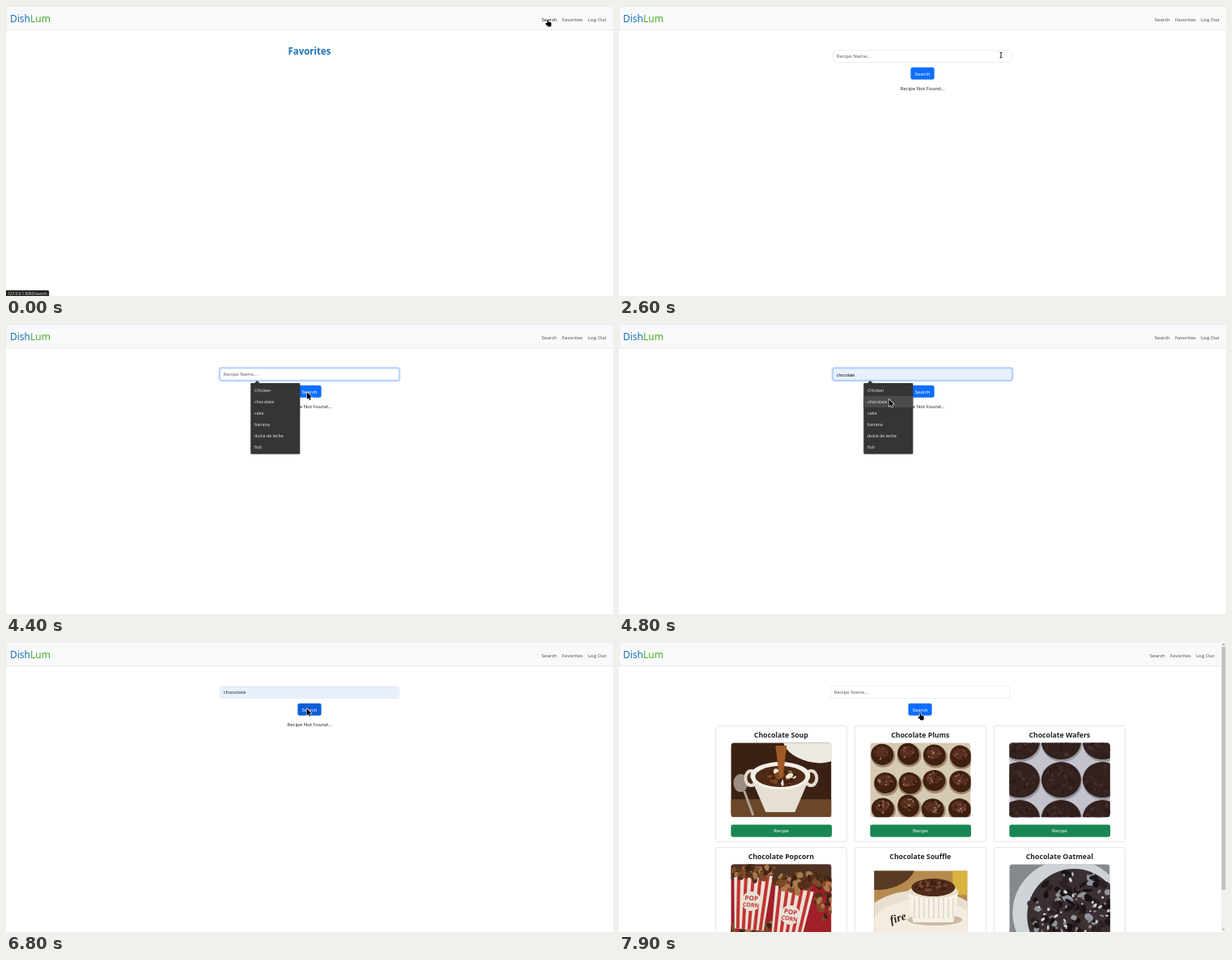
Write an HTML page with a canvas that moves like this. It is 750 px wide and 358 px high and loops after 8 s.

```html
<!DOCTYPE html>
<html lang="en">
<head>
<meta charset="utf-8">
<title>Recipe search</title>
<style>
html, body { margin: 0; width: 100%; height: 100%; overflow: hidden; background: #fff; }
canvas { display: block; width: 750px; height: 358px; }
</style>
</head>
<body>
<canvas id="stage"></canvas>
<script>
const W = 750, H = 358, LOOP = 8000, STEP = 100, SMALL = 6.05;
const SANS = '"Noto Sans", "Open Sans", sans-serif';
const INK = '#212529', GREY = '#4d4f51', BLUE = '#1b72b8';
const canvas = document.getElementById('stage');
const ctx = canvas.getContext('2d');
const ratio = window.devicePixelRatio || 1;
canvas.width = W * ratio;
canvas.height = H * ratio;

const items = ['CHicken', 'chocolate', 'cake', 'banana', 'dulce de leche', 'fish'];
const dishes = [
  ['Soup', soup], ['Plums', plums], ['Wafers', wafers],
  ['Popcorn', popcorn], ['Souffle', souffle], ['Oatmeal', oatmeal]
];

// Pointer stops: each is reached at `end` with an ease-out of the given power.
const home = { x: 669.5, y: 17 };
const stops = [
  { start: 1400, end: 2600, x: 472, y: 61, power: 1.7 },
  { start: 3800, end: 4800, x: 333.5, y: 93, power: 1.4 },
  { start: 5900, end: 6500, x: 371.5, y: 82, power: 1.6 },
  { start: 7600, end: 7900, x: 372.5, y: 88, power: 1 }
];

function text(str, x, y, size, color, align = 'left', weight = 400, family = SANS) {
  ctx.font = `${weight} ${size}px ${family}`;
  ctx.textAlign = align;
  ctx.fillStyle = color;
  ctx.fillText(str, x, y);
}

function rect(x, y, w, h, color) {
  ctx.fillStyle = color;
  ctx.fillRect(x, y, w, h);
}

function box(x, y, w, h, r, fill, stroke, line = 0.8) {
  ctx.beginPath();
  ctx.roundRect(x, y, w, h, r);
  if (fill) { ctx.fillStyle = fill; ctx.fill(); }
  if (stroke) { ctx.strokeStyle = stroke; ctx.lineWidth = line; ctx.stroke(); }
}

function oval(x, y, rx, ry, color, turn = 0) {
  ctx.fillStyle = color;
  ctx.beginPath();
  ctx.ellipse(x, y, rx, ry, turn, 0, Math.PI * 2);
  ctx.fill();
}

// Upright trapezoid centred on x, with half widths a (top) and b (bottom).
function taper(x, y, a, b, h, color) {
  ctx.fillStyle = color;
  ctx.beginPath();
  ctx.moveTo(x - a, y);
  ctx.lineTo(x + a, y);
  ctx.lineTo(x + b, y + h);
  ctx.lineTo(x - b, y + h);
  ctx.fill();
}

function turned(x, y, angle, paint) {
  ctx.save();
  ctx.translate(x, y);
  ctx.rotate(angle);
  paint();
  ctx.restore();
}

function seeded(seed) {
  return () => (seed = (seed * 16807) % 2147483647) / 2147483647;
}

// Random specks inside an ellipse.
function specks(count, x, y, rx, ry, size, colors) {
  const rnd = seeded(count * 31);
  for (let i = 0; i < count; i++) {
    const a = rnd() * Math.PI * 2, d = Math.sqrt(rnd());
    oval(x + rx * d * Math.cos(a), y + ry * d * Math.sin(a),
      size * (0.5 + rnd()), size * (0.4 + rnd() / 2), colors[i % colors.length], a * 3);
  }
}

function header(dx, hover) {
  rect(0, 0, W, 29, '#f8f9fa');
  rect(0, 0, W, 0.6, '#e3e4e6');
  rect(0, 0, 0.6, 29, '#e3e4e6');
  rect(0, 29, W, 0.7, '#dedfe1');
  text('Dish', 5, 19.5, 12, BLUE);
  text('Lum', 5 + ctx.measureText('Dish').width, 19.5, 12, '#4cb02e');
  text('Search', 661.7 + dx, 18.7, SMALL, hover ? INK : GREY);
  text('Favorites', 686.9 + dx, 18.7, SMALL, GREY);
  text('Log Out', 718.9 + dx, 18.7, SMALL, GREY);
}

function form(dx, { focus, filled, preview, value, caret, hot }) {
  const x = 264.3 + dx, left = x + 4.5;
  if (focus) box(x - 0.8, 53.9, 223, 16.4, 3, null, `rgba(13,110,253,${0.25 * focus})`, 1.8);
  box(x, 54.8, 221.4, 14.6, 2.4, filled ? '#e8f0fe' : '#fff', focus ? '#86b7fe' : '#e4e7ea', 0.7);
  if (preview) text(preview, left, 64.6, 5.25, '#111', 'left', 400, '"Liberation Sans", sans-serif');
  else if (value) text(value, left, 64.3, 6.1, INK);
  else text('Recipe Name...', left, 64.3, SMALL, '#565c62');
  if (caret) rect(value ? 296.8 : 269, 58.5, 0.6, 7, '#222');
  box(360.4 + dx, 75.8, 29.2, 15, 2.4, hot ? '#0b5ed7' : '#0d6efd');
  text('Search', 375 + dx, 85.5, SMALL, '#fff', 'center');
}

function dropdown(row) {
  const x = 302.3, y = 73, gap = 14.05;
  ctx.save();
  ctx.shadowColor = 'rgba(0,0,0,.3)';
  ctx.shadowBlur = 2 * ratio;
  box(x, y, 60.9, 87.6, 1, '#353535');
  ctx.restore();
  taper(x + 8, y - 3.2, 0, 3.4, 3.4, '#353535');
  if (row >= 0) rect(x, y + 1.8 + row * gap, 60.9, gap, '#4b4b4b');
  items.forEach((name, i) => text(name, x + 4.7, y + 10.5 + i * gap, 5.33, '#e4e4e4'));
}

// The dishes are painted around the centre of a 124 by 92 photo.
function soup() {
  rect(-62, -46, 124, 92, '#3a2114');
  rect(-62, 24, 124, 22, '#6b4629');
  oval(-50, 4, 9, 11, '#9c8d7f');
  turned(-46, 14, -0.35, () => rect(-1, 0, 3, 32, '#b0a294'));
  for (const side of [-1, 1]) {
    oval(side * 37, -2, 9, 11, '#e2dbcf');
    oval(side * 37, -2, 5, 7, '#4a2c1a');
  }
  taper(-1, -4, 37, 18, 44, '#e6dfd3');
  oval(-1, -5, 37, 17, '#f4f0e8');
  oval(-1, -4, 31, 13, '#4f2b17');
  specks(24, 0, -4, 17, 8, 4, ['#eee4d2', '#7c4723', '#3f2012']);
  oval(38, -42, 36, 20, '#efeae1', 0.25);
  taper(0, -42, 7, 2, 40, '#a05a26');
}

function plums() {
  rect(-62, -46, 124, 92, '#d6cab4');
  const rnd = seeded(77);
  for (let i = 0; i < 12; i++) {
    const x = -47 + (i % 4) * 31 + rnd() * 4, y = -32 + Math.floor(i / 4) * 32 + rnd() * 6;
    oval(x + 1, y + 2, 15, 14, '#a08a6c');
    oval(x, y, 14, 13, '#40200f', rnd());
    oval(x - 1, y - 3, 9, 7, '#593020');
    specks(5 + i, x, y - 2, 9, 8, 1.5, ['#7d4e38', '#2e150b', '#a47c64']);
  }
}

function wafers() {
  rect(-62, -46, 124, 92, '#c2c3cc');
  for (let i = 0; i < 9; i++) {
    const x = (i % 3 - 1) * 51 + 2, y = (Math.floor(i / 3) - 1) * 47;
    oval(x + 1, y + 2, 25, 23, '#96969f');
    oval(x, y, 24.5, 22, '#32211d');
    specks(26 + i, x, y, 20, 18, 2.5, ['#2a1a17', '#42302a', '#3a2822']);
  }
}

function carton(x, y, angle) {
  turned(x, y, angle, () => {
    taper(0, -22, 24, 18, 68, '#e9e1d7');
    for (let i = -2; i <= 2; i++) {
      turned(i * 9, -22, i * 0.03, () => rect(-2, 0, 4, 68, '#c23431'));
    }
    oval(0, 11, 12, 12, '#e9e1d7');
    text('POP', 0, 10, 8, '#c23431', 'center', 700);
    text('CORN', 0, 18, 7, '#c23431', 'center', 700);
  });
}

function popcorn() {
  const tones = ['#3f2416', '#7d4a28', '#57311c', '#a87a4a'];
  rect(-62, -46, 124, 92, '#a01f29');
  rect(-62, -46, 124, 19, '#4b3326');
  specks(50, -30, 40, 50, 12, 5, tones);
  specks(30, 54, -8, 12, 34, 4, tones);
  carton(-36, -11, 0.08);
  carton(13, 6, 0.17);
  specks(60, -34, -36, 27, 10, 4.5, tones);
  specks(64, 20, -24, 29, 11, 4.5, tones);
}

function souffle() {
  rect(-62, -46, 124, 92, '#b68a4f');
  oval(-40, -34, 34, 18, '#593a24', -0.3);
  rect(40, -38, 22, 30, '#d9b23f');
  oval(2, 24, 72, 38, '#e8dfcf');
  oval(4, 27, 62, 30, '#f3ecdf');
  oval(18, 23, 34, 7, '#cabba4');
  taper(16, -13, 31, 25, 39, '#f7f2e8');
  for (let x = -8; x < 44; x += 6) rect(x, -4, 1.2, 25, '#d9cebc');
  oval(16, -12, 31, 8, '#e9decb');
  oval(16, -17, 27, 11, '#4e2b1b');
  specks(40, 16, -19, 22, 6, 2, ['#754831', '#3a1e12']);
  turned(-36, 28, -0.3, () => text('fire', 0, 0, 14, '#33211a', 'left', 'italic 700', '"Liberation Serif", serif'));
}

function oatmeal() {
  rect(-62, -46, 124, 92, '#85898e');
  oval(12, 14, 70, 66, '#cdd3d7');
  oval(18, 18, 58, 58, '#3a3032');
  specks(150, 18, 16, 54, 54, 5, ['#1d1618', '#3f3032', '#2b2022', '#8f979d', '#171113']);
  specks(60, 18, 14, 50, 50, 2.2, ['#cfd3d6', '#8c8589']);
}

function card(x, y, title, paint, plain) {
  box(x - 81, y, 162, 143, 2.5, '#fff', '#dddee0');
  text(title, x, y + 14.8, 8.7, INK, 'center', 600);
  ctx.save();
  ctx.beginPath();
  if (plain) ctx.rect(x - 57, y + 29, 115, 76);
  else ctx.roundRect(x - 62, y + 20.8, 124.4, 91.8, 4);
  ctx.clip();
  ctx.translate(x, y + 66.5);
  paint();
  ctx.restore();
  box(x - 62, y + 121.9, 124.7, 15.2, 2.4, '#198754');
  text('Recipe', x, y + 131.6, SMALL, '#fff', 'center');
}

function results() {
  header(-6, false);
  form(-3, {});
  dishes.forEach(([name, paint], i) => {
    const x = 200.3 + (i % 3) * 172, y = 103.6 + Math.floor(i / 3) * 150;
    card(x, y, 'Chocolate ' + name, paint, paint === souffle);
  });
  rect(744, 0, 6, H, '#f1f1f1');
  rect(744.7, 6, 4.6, 300, '#c1c1c1');
  taper(747, 2, 0, 1.5, 2, '#8a8a8a');
  taper(747, 354, 1.5, 0, 2, '#8a8a8a');
}

const shapes = {
  hand() {
    ctx.roundRect(-0.8, 0, 1.7, 6, 0.8);
    ctx.roundRect(-0.8, 3, 5, 5.4, 1.3);
    ctx.roundRect(-2.8, 4, 4, 2.4, 1);
  },
  beam() {
    ctx.rect(-0.45, -3.3, 0.9, 6.4);
    for (const y of [-3.7, 2.5]) ctx.rect(-1.5, y, 3, 0.8);
  },
  arrow() {
    [[0, 0], [0, 8.8], [2.1, 7], [3.3, 9.8], [4.7, 9.2], [3.5, 6.5], [6.2, 6.2]]
      .forEach(([x, y]) => ctx.lineTo(x, y));
    ctx.closePath();
  }
};

function pointer(kind, x, y) {
  turned(x, y, 0, () => {
    ctx.lineJoin = 'round';
    ctx.lineWidth = 1.2;
    ctx.strokeStyle = '#fff';
    ctx.fillStyle = '#000';
    ctx.beginPath();
    shapes[kind]();
    ctx.stroke();
    ctx.fill();
  });
}

function place(t) {
  let { x, y } = home;
  for (const s of stops) {
    if (t < s.start) break;
    const p = 1 - (1 - Math.min(1, (t - s.start) / (s.end - s.start))) ** s.power;
    x += (s.x - x) * p;
    y += (s.y - y) * p;
  }
  return [x, y];
}

const between = (v, a, b) => v >= a && v < b;
const blink = (t, from) => Math.floor((t - from) / 500) % 2 === 0;

function searchPage(t, open, inList, hot) {
  const picked = t >= 5200;
  form(0, {
    hot,
    focus: between(t, 2800, 6700) ? Math.min(1, (t - 2700) / 150) : 0,
    caret: picked ? between(t, 5300, 6700) && blink(t, 5300) : open && !inList && blink(t, 2900),
    filled: inList || picked,
    preview: inList && items[1],
    value: picked && items[1]
  });
  text('Recipe Not Found...', 375, 103.8, SMALL, INK, 'center');
  if (open) dropdown(inList ? 1 : -1);
}

function draw(t) {
  const [x, y] = place(t);
  const inField = between(x, 264, 486) && between(y, 55, 70);
  const hot = between(t, 5900, 7700) && between(x, 360, 390) && between(y, 76, 91);
  const open = between(t, 2900, 5200);
  const inList = open && x < 363 && y > 73;

  rect(0, 0, W, H, '#fff');
  if (t >= 7700) {
    results();
  } else {
    header(0, t < 700);
    if (t < 700) text('Favorites', 375, 60.4, 11.5, BLUE, 'center', 600);
    else searchPage(t, open, inList, hot);
  }
  if (t < 1500) {
    box(-2, 351, 55.2, 9, 1.5, '#242424');
    text('127.0.0.1:5000/search', 2, 356.6, 4.75, '#dcdcdc');
  }
  const hand = t < 1200 || t >= 7800 || (hot && t < 6700);
  pointer(hand ? 'hand' : inField ? 'beam' : 'arrow', x, y);
}

const start = performance.now();
function tick() {
  const t = (performance.now() - start) % LOOP;
  ctx.setTransform(ratio, 0, 0, ratio, 0, 0);
  draw(Math.floor(t / STEP) * STEP);
  requestAnimationFrame(tick);
}
tick();
</script>
</body>
</html>
```
